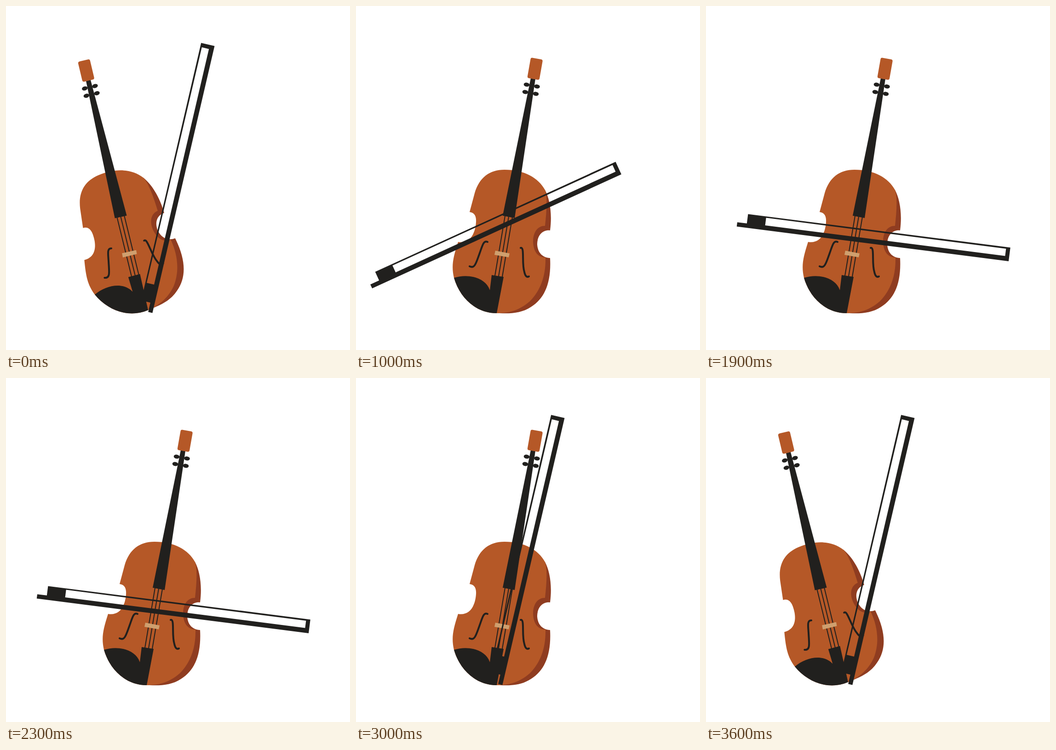
These frames come from a looping animation (748 px wide and 748 px high, 4600 ms). An HTML page:

```html
<!DOCTYPE html>
<html lang="en">
<head>
<meta charset="utf-8">
<title>Violin</title>
<style>
  html, body { margin: 0; width: 100%; height: 100%; overflow: hidden; background: #fff; }
  svg { display: block; width: 100%; height: 100%; }
  .ink { fill: #21201e; }
  .wood { fill: #b55827; }
  .side { fill: #8f3c20; }
  .line { fill: none; stroke: #21201e; stroke-linecap: round; }
</style>
</head>
<body>
<svg viewBox="0 0 748 748">
  <g id="violin">
    <path class="side" d="M411 400C421 419 427 450 422 488C404 486 394 501 394 518C395 536 405 547 422 548C425 602 410 636 381 654C360 668 338 669 312 668L380 560L370 500Z"/>
    <path class="wood" d="M323 356C366 356 397 374 411 400C417 418 414 450 411 478C394 478 385 493 385 513C386 533 394 546 412 547C413 585 402 618 378 642C359 659 336 668 306 668C262 668 226 636 213 591C207 565 211 547 222 513C245 517 259 499 261 470C262 455 256 449 247 448L258 407C268 373 290 356 323 356Z"/>
    <path class="ink" d="M213 591C245 581 282 591 291 618L295 585L321 589L306 668C262 668 226 636 213 591Z"/>
    <path class="line" stroke-width="2" d="M324 457L302 587M332 458L310 588M340 459L318 589"/>
    <path fill="#cf9f6e" d="M303 532L334 538L332 546.500L301 541Z"/>
    <path class="line" stroke-width="4" d="M286 513C277 509 275 521 268 540S258 572 247 566"/>
    <path class="line" stroke-width="4" d="M358 526C367 523 360 559 366 578Q369 592 376 588"/>
    <path class="ink" d="M380 157L390 159L345 461L319 456Z"/>
    <rect class="wood" x="-13.300" y="-22.500" width="26.600" height="45" rx="4" transform="translate(389.300 136.500) rotate(10)"/>
    <g id="pegs" class="ink"></g>
  </g>
  <!-- origin at the outer corner of the tip, stick running down -->
  <path id="bow" class="ink" fill-rule="evenodd" d="M-30 0H0V596H-9.500V575H-30ZM-26.300 9L-27 535H-10.500V9Z"/>
</svg>
<script>
const $ = id => document.getElementById(id);
const violin = $('violin'), bow = $('bow');

$('pegs').innerHTML = [[371, 171], [393.5, 175], [368, 187], [391, 191]].map(([x, y]) =>
  `<ellipse rx="6.300" ry="4.400" transform="translate(${x} ${y}) rotate(8)"/>`).join('');

// bow poses: tip x, tip y, angle
const rest = [453.5, 87, 13.1], raised = [419.5, 3, -6.35], lowered = [497, 136, 31],
  across = [577, 366, 65.4], left = [599, 492, 90.8], middle = [658, 555, 97.27],
  right = [740, 620, 103.2];

// [step, pose]; the second half of the loop mirrors the first
const keys = [[0, rest], [3, raised], [4, raised], [6, rest], [8, lowered], [10, across],
  [12, left], [13, middle], [14, right], [15, middle], [16, left], [17, middle], [18, right]];
const STEP = 100, LOOP = 4600, END = 36;

function bowAt(s) {
  const i = Math.max(1, keys.findIndex(k => k[0] >= s));
  const [s0, a] = keys[i - 1], [s1, b] = keys[i];
  const u = (s - s0) / (s1 - s0);
  return a.map((v, j) => v + (b[j] - v) * u);
}

function draw(ms) {
  const n = Math.min(END, Math.floor(ms % LOOP / STEP));
  const s = Math.min(n, END - n);
  const lean = Math.max(0, 1 - s / 3);
  const [x, y, angle] = bowAt(s);
  violin.setAttribute('transform',
    `translate(${291 + 5 * lean} ${670 - lean}) rotate(${-23.4 * lean}) translate(-291 -670)`);
  bow.setAttribute('transform', `translate(${x} ${y}) rotate(${angle})`);
}

const start = performance.now();
function tick(now) {
  draw(Math.max(0, now - start));
  requestAnimationFrame(tick);
}
draw(0);
requestAnimationFrame(tick);
</script>
</body>
</html>
```
